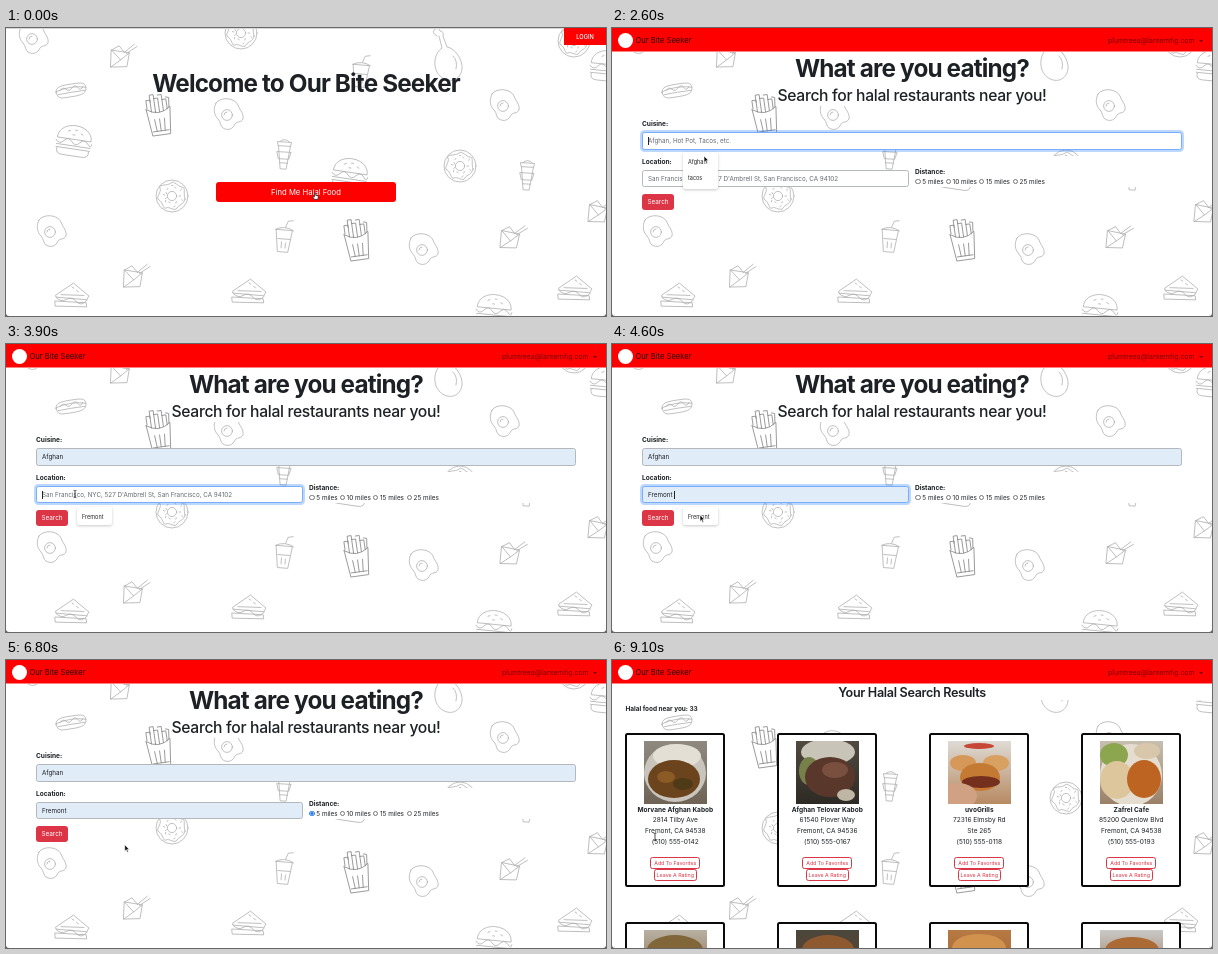
An HTML page with a canvas that plays this animation: 600 px wide and 288 px high, repeating every 9.2 s.

```html
<!DOCTYPE html>
<html lang="en">
<head>
<meta charset="utf-8">
<title>Our Bite Seeker</title>
<style>
html, body { margin: 0; width: 100%; height: 100%; overflow: hidden; background: #fff; }
#stage { position: relative; width: 600px; height: 288px; overflow: hidden; background: #fff;
  font-family: Inter, Roboto, sans-serif; color: #1d2024; }
#stage * { position: absolute; box-sizing: border-box; }
.page { left: 0; top: 0; width: 600px; height: 288px; }
.t { line-height: 20px; white-space: pre; }
.field { border: 1px solid #b4b8bd; border-radius: 2.5px; background: #fff; }
.field.filled { background: #e1ecf9; }
.field.focus { border-color: #78adfb; box-shadow: 0 0 0 2px rgba(13, 110, 253, .27); }
.caret { width: .7px; height: 8px; background: #222; }
.menu { background: #fff; border-radius: 2px; box-shadow: 0 1px 3px rgba(0, 0, 0, .22); }
.radio { width: 5.4px; height: 5.4px; border: .7px solid #777; border-radius: 50%; background: #fff; }
.radio.on { border-color: #1a73e8; background: radial-gradient(#1a73e8 1.3px, #fff 1.8px); }
.card { width: 100px; height: 154px; border: 2px solid #0a0a0a; border-radius: 2.5px; background: #fff; }
.small { border: .8px solid #dc3545; border-radius: 2.5px; background: #fff; }
.frame { left: 0; top: 0; width: 600px; height: 288px; border-radius: 0 0 3px 3px; box-shadow: 0 0 0 5px #555; }
</style>
</head>
<body>
<div id="stage"><canvas id="bg" width="600" height="288"></canvas></div>
<script>
const LOOP = 9200, BRAND = 'Our Bite Seeker';
const stage = document.getElementById('stage');
const bg = document.getElementById('bg').getContext('2d');

function el(parent, cls, x, y, w, h, css = {}) {
  const d = document.createElement('div');
  d.className = cls;
  Object.assign(d.style, { left: x + 'px', top: y + 'px' }, css);
  if (w) d.style.width = w + 'px';
  if (h) d.style.height = h + 'px';
  parent.append(d);
  return d;
}

// y is the middle of the capitals
function text(parent, str, x, y, size, o = {}) {
  const d = el(parent, 't', x, y - 10, 0, 0, {
    fontSize: size + 'px', fontWeight: o.w || 400, color: o.c || '#1d2024',
    letterSpacing: (o.ls || 0) + 'px', transform: o.mid ? 'translateX(-50%)' : ''
  });
  d.textContent = str;
  return d;
}

const show = (d, on) => { d.style.display = on ? 'block' : 'none'; };

// ---- doodles ----
const ring = (x, y, r) => `M${x + r} ${y}A${r} ${r} 0 1 1 ${x - r} ${y}A${r} ${r} 0 1 1 ${x + r} ${y}Z`;

function donutPath() {
  let p = ring(0, 0, 16) + ring(0, 0, 4.6) + 'M13 3C12 9 7 8 5 12S-3 10-6 12-9 6-13 4-10-4-12-8-4-10-1-13 6-9 10-9 11-2 13 3Z';
  for (let i = 0; i < 13; i++) {
    const a = i * 2.4, r = 7 + i % 3 * 1.7;
    p += `M${Math.cos(a) * r} ${Math.sin(a) * r}l${Math.cos(a * 2) * 1.6} ${Math.sin(a * 2) * 1.6}`;
  }
  return p;
}

const doodles = {
  donut: donutPath(),
  egg: 'M-13-11C-8-18 6-16 9-9 11-3 15-1 14 5 12 9 8 7 6 10 4 15-1 17-6 14-9 12-8 8-11 5-15 1-16-5-13-11Z' + ring(-2, 1, 5.4) + 'M-5 1q0-3 3-3',
  fries: 'M-12-7L-9 20H9L12-7Q0 2-12-7ZM-8 16H8M-11-8V-16h4V-4M-7-14V-21h4V-3M-3-17h4V-3M1-20h4V-4M5-15h4V-5M9-17l3 1-1 9M-5 4L-4 16M0 4V16M5 4L4 16',
  burger: 'M-17-2C-17-20 17-20 17-2ZM-18 1q4 5 8 0t8 0 8 0 8 0 4 0M-17 5H17M-17 8H17M-16 9Q-17 15-10 15H10Q17 15 16 9M-7-9l2-1M0-11h2M6-8l2 1M-2-6h2',
  coffee: 'M-7-12H7L6-8H-6ZM-6-8L-3 15H3L6-8M-7-2H7L5 5H-5ZM-5-12Q0-17 5-12M-4 9H4',
  soda: 'M-8-6H8L5 16H-5ZM-9-6Q0-11 9-6M1-9L3-15 8-16M-6 3H6M-2 6V12M2 7V12',
  box: 'M-10-5L8-4 7 10-9 12ZM-10-5L0 4 8-4M0 4L-9 12M-10-5L-3-10 3-4M3-4L12-13M5-3L15-11',
  hotdog: 'M-15 2C-16-4-9-5 1-6S15-7 15-1 8 6-2 7-13 8-15 2ZM-15 1Q0-5 15-2M-11 0q3-4 6-1t6-1 6 0 5-1M-13 4Q0 2 14 1',
  sandwich: 'M-16 2L0-12 17-1 15 3-15 4ZM-16 4Q-10 9-5 5T5 6 16 3M-16 8L15 6 16 10-15 13ZM-11 1L12-1M-1-8l2 1M4-5l2 1',
  leg: 'M-10-20Q-16-23-12-27-8-29-7-25-3-25-4-20L0-9C8-8 16 4 15 13 13 28-5 28-11 14-14 5-11-4-5-8L-8-20M6 0Q11 5 9 13'
};
for (const k in doodles) doodles[k] = new Path2D(doodles[k]);

const scene = [
  ['egg', 28, 10], ['donut', 235, 5], ['box', 115, 28, .1], ['donut', 568, 13], ['egg', 223, 86], ['burger', 602, 38, .1],
  ['egg', 499, 77], ['leg', 441, 28], ['soda', 355, 43, .08], ['hotdog', 65, 62, -.05], ['fries', 153, 87, -.14],
  ['burger', 68, 113, .15], ['coffee', 278, 126, .06], ['donut', 166, 168], ['donut', 454, 138], ['burger', 344, 146, .15],
  ['coffee', 521, 147, .06], ['soda', 278, 208, .08], ['fries', 351, 212, -.14], ['egg', 46, 203], ['egg', 418, 221],
  ['box', 505, 209, .15], ['box', 128, 248, .1], ['box', 593, 183, .15], ['sandwich', 66, 267, .12],
  ['sandwich', 243, 263, .12], ['sandwich', 569, 260, .12], ['burger', 488, 282, .1]
];
bg.lineWidth = .75;
bg.lineJoin = bg.lineCap = 'round';
for (const [kind, x, y, turn = 0] of scene) {
  bg.save();
  bg.translate(x, y);
  bg.rotate(turn);
  bg.strokeStyle = kind === 'fries' ? '#808080' : '#adadad';
  bg.stroke(doodles[kind]);
  bg.restore();
}

const title = (page, str, y) => text(page, str, 300, y, 24.3, { w: 700, mid: 1, ls: -.85 });

// ---- landing ----
const landing = el(stage, 'page', 0, 0);
el(landing, '', 0, 0, 600, 1, { background: '#d8d8d8' });
title(landing, 'Welcome to ' + BRAND, 55);
el(landing, '', 558, 0, 42, 17, { background: '#f00' });
text(landing, 'LOGIN', 579, 9, 5.7, { c: '#fff', mid: 1, w: 500 });
const findBtn = el(landing, '', 210, 154, 180, 20, { background: '#f00', borderRadius: '3px' });
text(landing, 'Find Me Halal Food', 300, 164.5, 7.7, { c: '#fff', mid: 1 });

// ---- search form ----
function navbar(page) {
  el(page, '', 0, 0, 600, 24, { background: 'linear-gradient(#f00 23.5px, #ff8080 23.5px)' });
  el(page, '', 5.5, 4.5, 15, 15, { background: '#fff', borderRadius: '50%' });
  text(page, BRAND, 23.5, 12.5, 7.6, { c: 'rgba(0,0,0,.85)' });
  text(page, 'plumtreea@lanternfig.com', 496, 12.5, 6.9, { c: 'rgba(0,0,0,.55)' });
  el(page, '', 587, 11.5, 0, 0, { border: '2px solid transparent', borderTopColor: 'rgba(0,0,0,.55)', borderBottom: 0 });
}

const form = el(stage, 'page', 0, 0);
for (const [x, y, w, h] of [[180, 26, 240, 32], [165, 58, 270, 20], [30, 90, 106, 14], [30, 122, 62, 19], [303, 128, 267, 31]])
  el(form, '', x, y, w, h, { background: '#fff' });
navbar(form);
title(form, 'What are you eating?', 40);
text(form, 'Search for halal restaurants near you!', 300, 68, 15.7, { w: 500, mid: 1, ls: -.32 });
const label = (s, x, y) => text(form, s, x, y, 6.6, { w: 700, ls: -.04 });
label('Cuisine:', 30, 96);
label('Location:', 30, 133.5);
label('Distance:', 303, 143.5);

function field(y, w, hint, value, caretX) {
  const box = el(form, 'field', 30, y, w, 17.5);
  const mid = y + 9;
  const ph = text(form, hint, 36, mid, 6.3, { c: '#626970' });
  const val = text(form, value, 36, mid, 6.3);
  const caret = el(form, 'caret', 0, mid - 4);
  return (filled, focus) => {
    box.className = 'field' + (filled ? ' filled' : '') + (focus ? ' focus' : '');
    show(ph, !filled);
    show(val, filled);
    show(caret, focus);
    caret.style.left = (filled ? caretX : 36) + 'px';
  };
}
const cuisine = field(104, 540, 'Afghan, Hot Pot, Tacos, etc.', 'Afghan', 58);
const place = field(141.5, 266.5, "San Francisco, NYC, 527 D'Ambrell St, San Francisco, CA 94102", 'Fremont', 61.5);

const radios = [[5, 303.3], [10, 333.6], [15, 367], [25, 400.5]].map(([n, x]) => {
  text(form, n + ' miles', x + 7, 153.5, 6.4);
  return el(form, 'radio', x, 150.6);
});
const searchBtn = el(form, '', 30, 166, 32, 16, { borderRadius: '3px' });
text(form, 'Search', 46, 174, 6.4, { c: '#fff', mid: 1 });

function menu(y, h, items) {
  const m = el(form, 'menu', 71, y, 35, h);
  items.forEach((s, i) => text(m, s, 5, 10.5 + i * 16, 5.5, { c: '#222' }));
  return m;
}
const menuA = menu(123.5, 37, ['Afghan', 'tacos']);
const menuB = menu(162.5, 18.5, ['Fremont']);

// ---- results ----
const results = el(stage, 'page', 0, 0);
el(results, '', 0, 24, 600, 16, { background: '#fff' });
el(results, '', 180, 40, 245, 20, { background: '#fff' });
navbar(results);
text(results, 'Your Halal Search Results', 300, 32.5, 12.6, { w: 600, mid: 1, ls: -.32 });
text(results, 'Halal food near you: 33', 13.5, 48.5, 6.5, { w: 700, ls: -.05 });

// soft picture: base tones, then ellipses [x, y, rx, ry, colour]
function photo(card, top, bottom, blobs) {
  const c = document.createElement('canvas'), g = c.getContext('2d');
  c.width = c.height = 63;
  Object.assign(c.style, { left: '17px', top: '6px' });
  const grad = g.createLinearGradient(0, 0, 0, 63);
  grad.addColorStop(0, top);
  grad.addColorStop(1, bottom);
  g.fillStyle = grad;
  g.fillRect(0, 0, 63, 63);
  for (const [x, y, rx, ry, color] of blobs) {
    g.fillStyle = color;
    g.beginPath();
    g.ellipse(x, y, rx, ry, 0, 0, 7);
    g.fill();
  }
  card.append(c);
}

const places = [
  ['Morvane Afghan Kabob', '2814 Tilby Ave', 'Fremont, CA 94538', '(510) 555-0142'],
  ['Afghan Telovar Kabob', '61540 Plover Way', 'Fremont, CA 94536', '(510) 555-0167'],
  ['uvoGrills', '72316 Elmsby Rd', 'Ste 265', '(510) 555-0118'],
  ['Zafrel Cafe', '85200 Quenlow Blvd', 'Fremont, CA 94538', '(510) 555-0193']
];
const photos = [
  ['#8f8a80', '#6e6355', [[31, 32, 31, 29, '#c9c5bc'], [33, 15, 24, 12, '#e3dfd5'], [30, 38, 26, 19, '#6b431c'], [22, 36, 9, 6, '#8b5b25'], [39, 43, 10, 6, '#4f3a18']]],
  ['#504a40', '#2d2924', [[32, 11, 27, 13, '#c8c4b7'], [13, 30, 10, 14, '#77804b'], [34, 36, 25, 20, '#59372a'], [39, 29, 13, 8, '#795040'], [50, 54, 9, 6, '#bfb6a5']]],
  ['#dedbd5', '#b78a62', [[15, 22, 13, 8, '#d59859'], [48, 22, 13, 8, '#d8a162'], [31, 5, 15, 3, '#c74737'], [32, 36, 20, 14, '#c47a32'], [33, 41, 19, 6, '#74301d'], [10, 55, 19, 13, '#d0a183']]],
  ['#c6bfb0', '#9a8068', [[31, 34, 31, 31, '#e5ded0'], [14, 14, 14, 12, '#8ba64f'], [17, 39, 17, 19, '#ddc69c'], [44, 38, 17, 19, '#bd6422'], [47, 10, 13, 8, '#d9c7ab']]]
];
const nextRow = [
  ['#b8b0a2', '#7b5c32', [[31, 20, 28, 15, '#806638']]],
  ['#4b463b', '#684129', [[32, 20, 26, 15, '#8f5930']]],
  ['#b67a44', '#a15b25', [[31, 18, 27, 14, '#d0924d']]],
  ['#c9c9c7', '#8b582c', [[32, 20, 27, 13, '#ac6a35']]]
];

places.forEach((lines, i) => {
  const x = 13 + i * 152, card = el(results, 'card', x, 73);
  photo(card, ...photos[i]);
  photo(el(results, 'card', x, 262), ...nextRow[i]);
  lines.forEach((s, n) => text(results, s, x + 50.3, 149.5 + n * 10.8, 6.55, { w: n ? 400 : 700, mid: 1 }));
  [['Add To Favorites', 197.4, 50], ['Leave A Rating', 209.2, 43]].forEach(([s, y, w]) => {
    el(results, 'small', x + 50.3 - w / 2, y, w, 11.4);
    text(results, s, x + 50.3, y + 5.7, 5.3, { c: '#dc3545', mid: 1 });
  });
});
el(stage, 'frame', 0, 0);

// ---- pointer ----
const NS = 'http://www.w3.org/2000/svg';
const svg = document.createElementNS(NS, 'svg'), pen = document.createElementNS(NS, 'path');
svg.setAttribute('width', 600);
svg.setAttribute('height', 288);
svg.append(pen);
stage.append(svg);
// [path, fill, stroke, width]
const pointers = {
  arrow: ['M0 0V6.4L1.5 5 2.6 7.5 3.7 7 2.6 4.6H4.6Z', '#111', '#fff', .6],
  hand: ['M-.6 0Q.1-.7.7 0V2.3L3 2.9Q3.6 3.2 3.4 4.1L2.8 6.4H-.6L-2.3 3.9Q-2 3-.6 3.9Z', '#fff', '#222', .8],
  beam: ['M-1.4-3.6Q0-3.6 0-2.8 0-3.6 1.4-3.6M0-2.8V2.8M-1.4 3.6Q0 3.6 0 2.8 0 3.6 1.4 3.6', 'none', '#222', .8]
};

// [start, end, x, y]: glide to x, y
const START = [309, 165];
const moves = [
  [1600, 2300, 74, 115], [2300, 2600, 92, 128], [2600, 2800, 90, 131], [2800, 3500, 69, 150],
  [4000, 4500, 88, 171], [4700, 4900, 92, 172], [5000, 5600, 308, 151], [6000, 6900, 112, 186], [7200, 7800, 42, 174], [8900, 9000, 43, 177]
];
function pointerAt(t) {
  let [x, y] = START;
  for (const [a, b, tx, ty] of moves) {
    if (t <= a) break;
    const k = Math.min(1, (t - a) / (b - a)), e = k * k * (3 - 2 * k);
    x += (tx - x) * e;
    y += (ty - y) * e;
  }
  return [x, y];
}

function kindAt(t, x, y) {
  if (t < 800) return 'hand';
  if (t >= 9000) return 'beam';
  if (x > 30 && x < 62 && y > 166 && y < 182) return 'hand';
  const overField = (x < 570 && y > 104 && y < 121.5) || (x < 296 && y > 141.5 && y < 159);
  const overMenu = t >= 2400 && t < 2800 && y > 123;
  return overField && x > 30 && !overMenu ? 'beam' : 'arrow';
}

function draw(t) {
  show(landing, t < 800);
  show(form, t >= 800 && t < 9000);
  show(results, t >= 9000);
  findBtn.style.background = t >= 700 ? '#e60000' : '#f00';

  cuisine(t >= 2700, t >= 2300 && t < 3700);
  place(t >= 4400, t >= 3700 && t < 5800);
  show(menuA, t >= 2400 && t < 2800);
  show(menuB, t >= 3800 && t < 4700);
  radios[0].className = t >= 5800 ? 'radio on' : 'radio';
  searchBtn.style.background = t >= 8300 ? '#b02a37' : t >= 7700 ? '#bb2d3b' : '#dc3545';

  const [x, y] = pointerAt(t);
  const [d, fill, stroke, width] = pointers[kindAt(t, x, y)];
  pen.setAttribute('d', d);
  pen.setAttribute('transform', `translate(${x} ${y})`);
  pen.setAttribute('fill', fill);
  pen.setAttribute('stroke', stroke);
  pen.setAttribute('stroke-width', width);
}

const began = performance.now();
function tick() {
  const t = (performance.now() - began) % LOOP;
  draw(Math.floor(t / 100) * 100);
  requestAnimationFrame(tick);
}
tick();
</script>
</body>
</html>
```
